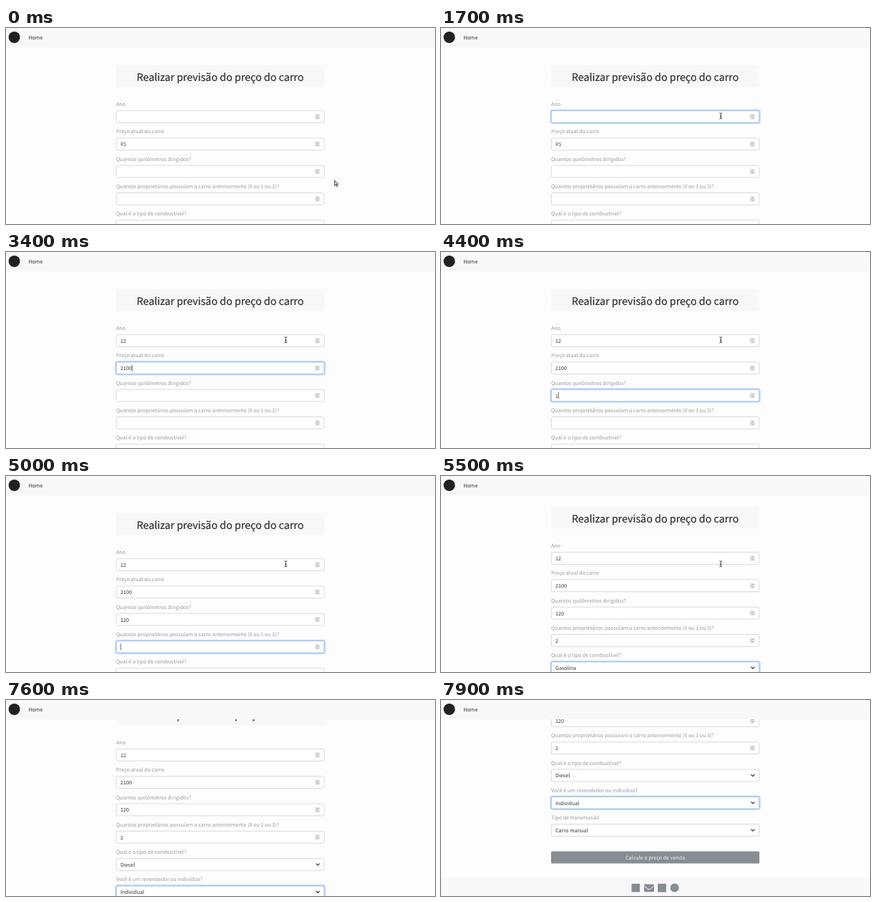
These frames come from a looping animation (600 by 274 pixels, 8000 ms). An HTML page:

```html
<!DOCTYPE html>
<html lang="pt">
<head>
<meta charset="utf-8">
<style>
html, body { margin: 0; width: 100%; height: 100%; overflow: hidden; background: #fdfdfe; }
svg { display: block; width: 100vw; height: 100vh; }
text {
  font: 7.16px "Noto Sans CJK JP", "Noto Sans CJK SC", "Noto Sans CJK KR", "Noto Sans CJK TC", "Noto Sans CJK", sans-serif;
  text-rendering: geometricPrecision;
  fill: #333;
}
.title { font-size: 14.32px; font-weight: 500; stroke: #333; stroke-width: .22; }
.label { fill: #9b9b9d; }
.hint { fill: #555; }
.mid { text-anchor: middle; }
.white { fill: #f4f4f5; }
</style>
</head>
<body>
<svg id="stage" viewBox="0 0 600 274"></svg>
<script>
const LOOP = 8000, STEP = 100, ROW = 38.3, LEFT = 154, WIDTH = 291.3;
const labels = [
  'Ano', 'Preço atual do carro', 'Quantos quilômetros dirigidos?',
  'Quantos proprietários possuíam o carro anteriormente (0 ou 1 ou 3)?',
  'Qual é o tipo de combustível?', 'Você é um revendedor ou indivíduo?', 'Tipo de transmissão'
];
const start = ['', '', '', '', 'Gasolina', 'Distribuidora', 'Carro manual'];

// [time, row, value]
const edits = [
  [2300, 0, '1'], [2500, 0, '12'],
  [3200, 1, '21'], [3300, 1, '210'], [3400, 1, '2100'],
  [4400, 2, '1'], [4500, 2, '12'], [4600, 2, '120'],
  [5300, 3, '2'], [6000, 4, 'Diesel'], [7100, 5, 'Individual']
];
// [time, row, fade duration]
const focuses = [[800, 0, 400], [2700, 1, 200], [3700, 2, 100], [4800, 3, 0], [5500, 4, 0], [6800, 5, 0]];
const scrolls = [[0, 0], [5500, 9], [6700, 47.2], [7800, 112], [7900, 171.8]];
// [time, shape, x, y]
const moves = [
  [0, 'arrow', 459.6, 213], [300, 'arrow', 578, 150], [400, 'arrow', 478, 69],
  [500, 'beam', 361, 112], [600, 'beam', 391.3, 122.8],
  [7500, 'beam', 423.5, 122.8], [7600, 'none', 0, 0]
];
const blinks = [1200, ...edits.map(e => e[0]), ...focuses.slice(1).map(f => f[0])];

const latest = (list, t) => list.filter(e => e[0] <= t).pop();
const text = (x, y, s, cls = '') => `<text x="${x}" y="${y}" class="${cls}">${s}</text>`;
const rect = (x, y, w, h, fill, r = 0, more = '') =>
  `<rect x="${x}" y="${y}" width="${w}" height="${h}" rx="${r}" fill="${fill}" ${more}/>`;
const line = (d, color, w) =>
  `<path d="${d}" fill="none" stroke="${color}" stroke-width="${w}" stroke-linecap="round" stroke-linejoin="round"/>`;

function glow(row, t) {
  const i = focuses.findLastIndex(f => f[0] <= t);
  if (i < 0) return 0;
  const [time, current, fade] = focuses[i];
  const p = Math.min(1, (t - time + STEP) / (fade + STEP));
  if (row === current) return p;
  return i && row === focuses[i - 1][1] ? 1 - p : 0;
}

function caret(row, value, t) {
  const focus = latest(focuses, t);
  const since = t - Math.max(...blinks.filter(b => b <= t));
  if (!focus || focus[1] !== row || row > 3 || !(since % 1000 < 500)) return '';
  return rect(160 + value.length * 3.98, 119.4, .6, 9.2, '#222');
}

function field(row, t) {
  const edit = latest(edits.filter(e => e[1] === row), t);
  const value = edit ? edit[2] : start[row];
  const g = glow(row, t);
  const hint = row === 1 && !value;
  const box = (color, w, alpha, grow = 0) => rect(LEFT + .2 - grow, 115.6 - grow, WIDTH - .4 + 2 * grow, 16.8 + 2 * grow,
    'none', 2 + grow, `stroke="${color}" stroke-width="${w}" opacity="${alpha}"`);
  const control = row < 4
    ? rect(431.8, 120, 7.6, 8, '#e9e9eb', 1) + line('M434.2 123.2l1.4-1.5 1.4 1.5M434.2 124.9l1.4 1.5 1.4-1.5', '#77777a', .7)
    : line('M433.9 122.9l2.2 2.3 2.2-2.3', '#333', 1.2);
  return `<g transform="translate(0 ${row * ROW})">`
    + text(LEFT, 109.2, labels[row], 'label')
    + rect(LEFT, 115.4, WIDTH, 17.2, '#fff', 2)
    + box('#cfd1d6', .8, 1)
    + (g ? box('#c3dafb', 1.7, g, 1) + box('#8db8f3', .8, g) : '')
    + text(160, 127, hint ? 'R$' : value, hint ? 'hint' : '')
    + control + caret(row, value, t) + '</g>';
}

function footer() {
  const grey = '#868c92', y = 434.4;
  return rect(0, 420, 600, 30, '#f8f8fb')
    + rect(266.6, y - 5.8, 11.6, 11.6, grey)
    + rect(284, y - 5, 14, 10.6, grey, 1.4)
    + line(`M284.2 ${y - 2.4}l5.6 4.2q1.2 .8 2.4 0l5.6-4.2`, '#f8f8fb', 1)
    + rect(303.2, y - 5.8, 11.8, 11.8, grey)
    + `<circle cx="326.7" cy="${y}" r="6" fill="${grey}"/>`;
}

function pointer(t) {
  const [, shape, x, y] = latest(moves, t);
  const at = d => `<g transform="translate(${x} ${y})">${d}</g>`;
  if (shape === 'beam') return at(line('M-1.5-4Q0-4 0-3Q0-4 1.5-4M0-3V3M-1.5 4Q0 4 0 3Q0 4 1.5 4M-.9 .8H.9', '#333', .9));
  if (shape === 'arrow') return at('<path d="M0 0v7.4l1.7-1.5 1.2 2.7 1.2-.5-1.2-2.6h2.2z" fill="#ddd" stroke="#333" stroke-width=".9"/>');
  return '';
}

function scene(t) {
  return rect(0, 0, 600, 274, '#fdfdfe')
    + `<g transform="translate(0 ${-latest(scrolls, t)[1]})">`
    + rect(LEFT, 51.8, WIDTH, 30.8, '#f8f8fa')
    + text(299.6, 73.5, 'Realizar previsão do preço do carro', 'title mid')
    + labels.map((_, row) => field(row, t)).join('')
    + rect(LEFT, 383.4, WIDTH, 17, '#878d92', 1.6)
    + text(299.6, 394.6, 'Calcule o preço de venda', 'mid white')
    + footer() + '</g>'
    + rect(0, 0, 600, 27, '#f8f8fb')
    + '<circle cx="11.6" cy="13" r="8" fill="#222"/>'
    + text(31.3, 15.8, 'Home')
    + pointer(t);
}

const stage = document.getElementById('stage');
let shown = -1;
function draw() {
  const t = Math.floor(performance.now() % LOOP / STEP) * STEP;
  if (t !== shown) stage.innerHTML = scene(shown = t);
  requestAnimationFrame(draw);
}
draw();
</script>
</body>
</html>
```
